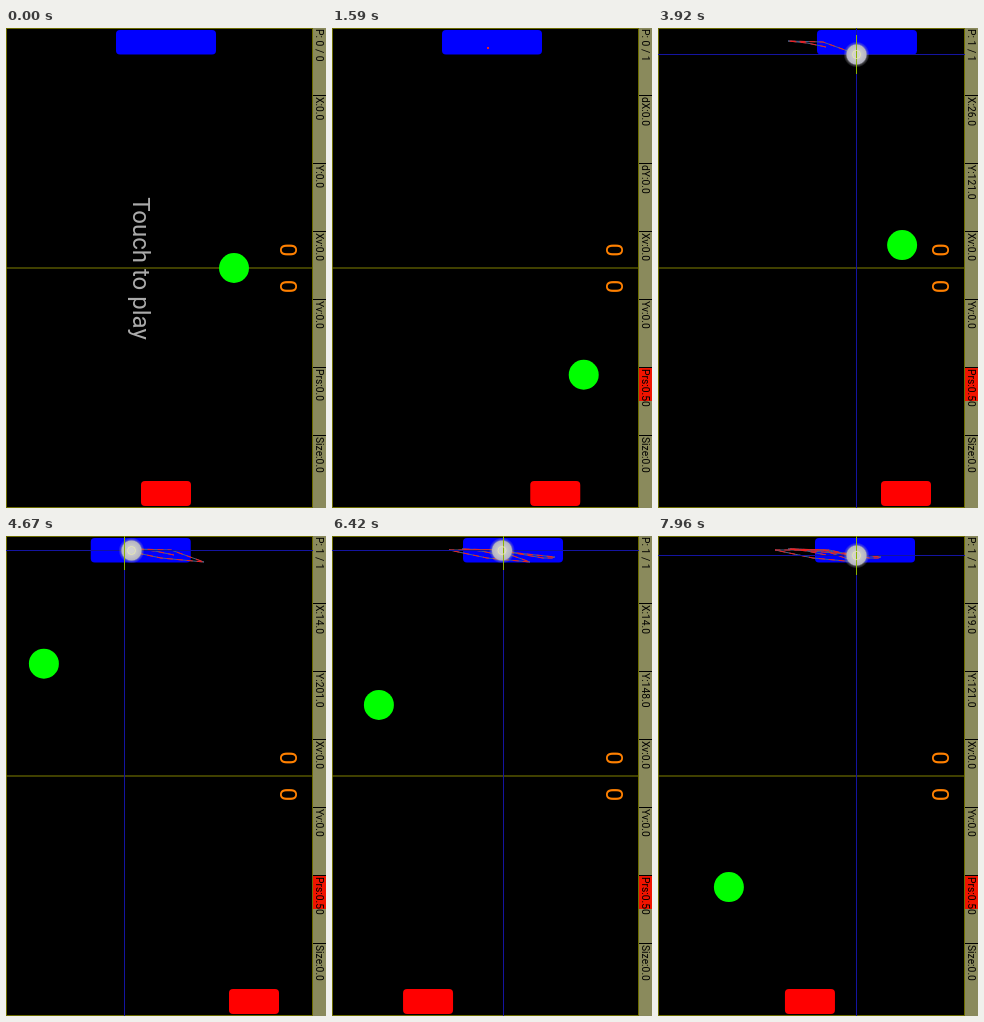
Animation, 320 px wide and 480 px high, one loop 8 s. Source, as an HTML page with a canvas:

```html
<!DOCTYPE html>
<html lang="en">
<head>
<meta charset="utf-8">
<title>Touch pong</title>
<style>
html, body { margin: 0; width: 100%; height: 100%; overflow: hidden; background: #000; }
canvas { display: block; }
</style>
</head>
<body>
<canvas id="stage" width="320" height="480"></canvas>
<script>
const ctx = document.getElementById('stage').getContext('2d');
const LOOP = 8000, STEP = 1000 / 24, FONT = 'Roboto, "Noto Sans", sans-serif';
const START = 1010, TAP = 930, DRAG = 2450, LAG = 60;

// Each key is [time, value, ...]; values run linearly between keys.
const ballX = [ // travelled distance, folded between the side walls
  [START, 213], [1590, 237], [2073, 245], [2750, 475], [3917, 875],
  [5417, 1379], [6417, 1688], [7958, 2152], [8000, 2165]];
const ballY = [
  [START, 240], [1590, 348], [2073, 438], [2750, 357], [3917, 217],
  [5395, 41], [5417, 43], [6417, 169], [7958, 351], [8000, 356]];
const redX = [
  [START, 160], [1590, 224], [1810, 248], [5417, 248], [6417, 96],
  [6460, 92], [7390, 242], [7958, 152], [8000, 146]];
const blueX = [
  [2400, 160], [2500, 170], [2750, 167], [3100, 142], [3917, 209],
  [4600, 127], [5417, 222], [6417, 181], [7000, 142], [7958, 207]];
const touch = [
  [DRAG, 168, 19], [2660, 149, 15], [2750, 149, 15], [3100, 130, 13],
  [3400, 165, 14], [3840, 198, 26], [3920, 198, 26], [4250, 155, 22],
  [4600, 117, 14], [5000, 165, 14], [5350, 211, 22], [5365, 211, 22],
  [5417, 220, 22], [5460, 223, 21], [5900, 185, 17], [6350, 171, 14],
  [6360, 171, 14], [6417, 169.5, 14], [7000, 132, 13], [7880, 198, 19]];

function at(keys, t, i = 1) {
  const n = keys.findIndex(k => k[0] > t);
  if (n === 0) return keys[0][i];
  if (n < 0) return keys[keys.length - 1][i];
  const a = keys[n - 1], b = keys[n];
  return a[i] + (b[i] - a[i]) * (t - a[0]) / (b[0] - a[0]);
}
const point = t => [at(touch, t), at(touch, t, 2)];

function rect(color, x, y, w, h) {
  ctx.fillStyle = color;
  ctx.fillRect(x, y, w, h);
}
function disc(color, x, y, r) {
  ctx.fillStyle = color;
  ctx.beginPath();
  ctx.arc(x, y, r, 0, 7);
  ctx.fill();
}
function paddle(color, center, y, w, h) {
  ctx.fillStyle = color;
  ctx.beginPath();
  ctx.roundRect(center - w / 2, y, w, h, 4);
  ctx.fill();
}
function sideText(text, x, y, size, color, align = 'left') {
  ctx.save();
  ctx.translate(x, y);
  ctx.rotate(Math.PI / 2);
  ctx.font = `${size}px ${FONT}`;
  ctx.fillStyle = color;
  ctx.textAlign = align;
  ctx.fillText(text, 0, 0);
  ctx.restore();
}

function drawField(t) {
  rect('#000', 0, 0, 320, 480);
  ctx.lineWidth = 1;
  ctx.strokeStyle = '#6c6c00';
  ctx.strokeRect(0.5, 0.5, 306, 479);
  if (t < START) sideText('Touch to play', 127, 240.5, 24, '#aaa', 'center');
  rect('#808000', 0, 239.5, 306, 1);
  paddle('#00f', at(blueX, t), 2, 100, 24.5);
  paddle('#f00', at(redX, t), 453, 50, 25);
  sideText('0', 274, 222, 24, '#ff8000', 'center');
  sideText('0', 274, 258.5, 24, '#ff8000', 'center');
  const x = 15 + 276 - Math.abs(276 - at(ballX, t) % 552);
  disc('#0f0', x, at(ballY, t), 15);
}

function drawBar(labels, pressed) {
  rect('#8a8a5c', 307, 0, 13, 480);
  if (pressed) rect('#f01400', 307, 340, 13, 33);
  labels.forEach((label, i) => {
    const y = i * 68;
    if (i) rect('#000', 307, y - 1, 13, 1);
    sideText(label, 310, y + 1, 10.3, '#000');
  });
}

function drawTrail(t) {
  ctx.beginPath();
  ctx.moveTo(...point(DRAG));
  for (const [time, x, y] of touch) if (time < t) ctx.lineTo(x, y);
  ctx.lineTo(...point(t));
  ctx.strokeStyle = '#46648c';
  ctx.stroke();
  ctx.setLineDash([6, 4]);
  ctx.strokeStyle = '#f02020';
  ctx.stroke();
  ctx.setLineDash([]);
}

function drawPointer([x, y], [crossX, crossY]) {
  rect('#1414a0', 0, crossY, 307, 1);
  rect('#1414a0', crossX, 0, 1, 480);
  const hx = x + 0.5, hy = y + 0.5;
  const glow = ctx.createRadialGradient(hx, hy, 2, hx, hy, 13);
  glow.addColorStop(0, '#d2d2d2');
  glow.addColorStop(0.68, '#b4b4c0');
  glow.addColorStop(0.8, 'rgba(160,160,170,.4)');
  glow.addColorStop(1, 'rgba(160,160,170,0)');
  disc(glow, hx, hy, 13);
  rect('#8cb400', crossX, Math.max(0, crossY - 19), 1, Math.min(crossY, 19) + 20);
  ctx.strokeStyle = '#e6e6b4';
  ctx.beginPath();
  ctx.arc(hx, hy, 4, 0, 7);
  ctx.stroke();
}

function draw(t) {
  const dragging = t >= DRAG, tapping = t >= TAP && t < START;
  const down = dragging || tapping, touched = t >= TAP;
  const pos = dragging ? point(t) : [155, 19];
  const cross = (dragging ? point(Math.max(DRAG, t - LAG)) : pos).map(Math.round);

  drawField(t);
  if (dragging) drawTrail(t);
  else if (touched) rect('#f02020', 155, 19, 2, 2);
  if (down) drawPointer(pos, cross);

  const d = touched ? 'd' : '';
  drawBar([
    `P: ${+down} / ${+touched}`,
    down ? `X:${cross[1].toFixed(1)}` : `${d}X:0.0`,
    down ? `Y:${(319 - cross[0]).toFixed(1)}` : `${d}Y:0.0`,
    'Xv:0.0', 'Yv:0.0', touched ? 'Prs:0.50' : 'Prs:0.0', 'Size:0.0'
  ], touched);
}

const begin = performance.now();
function frame() {
  const t = (performance.now() - begin) % LOOP;
  draw(Math.floor((t + 2) / STEP) * STEP);
  requestAnimationFrame(frame);
}
frame();
</script>
</body>
</html>
```
